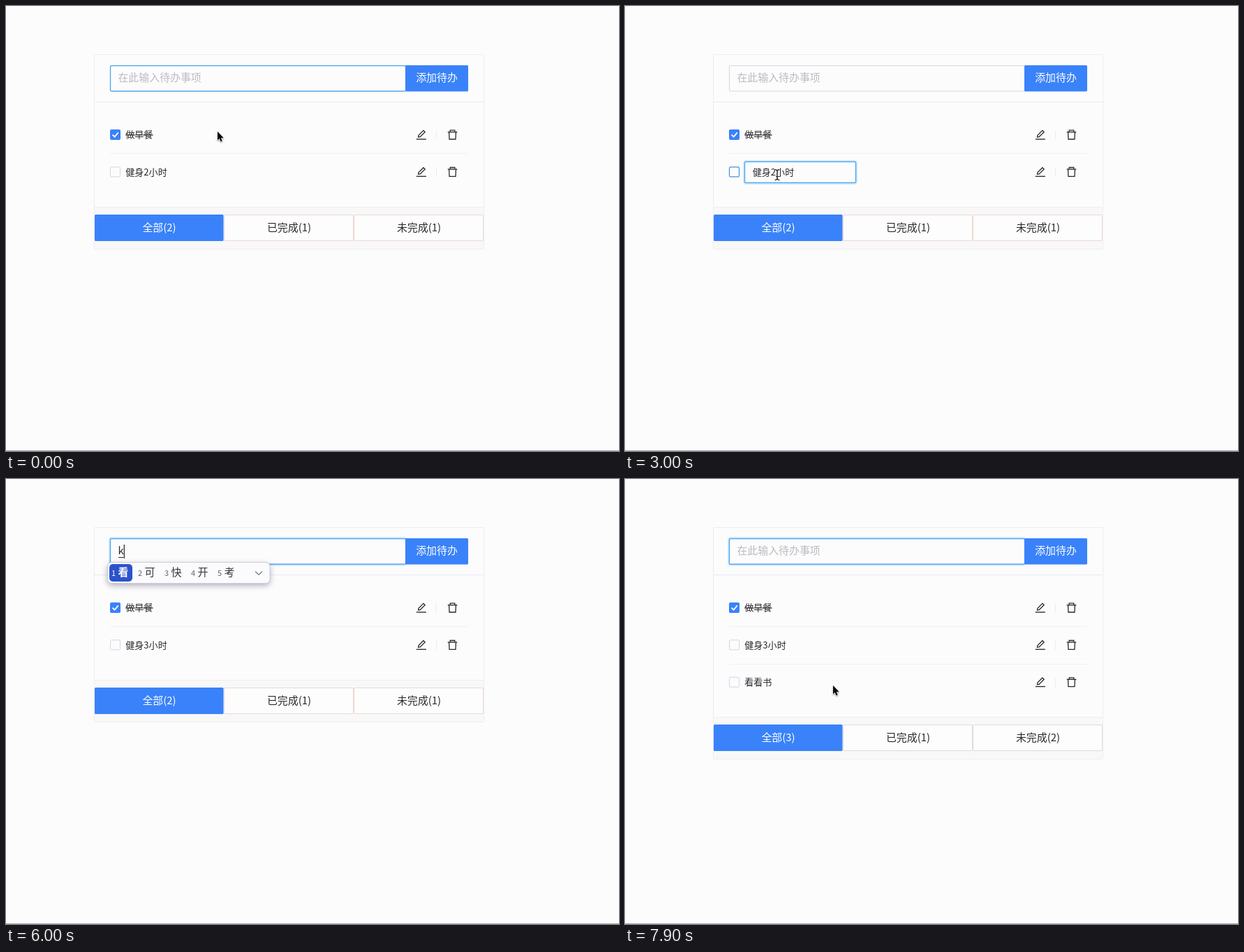
An HTML page with a canvas that plays this animation: 878x638 px, repeating every 8000 ms.

```html
<!DOCTYPE html>
<html lang="zh-CN">
<head>
<meta charset="utf-8">
<title>待办事项</title>
<style>
html, body { margin: 0; width: 100%; height: 100%; overflow: hidden; background: #fcfcfd; }
canvas { display: block; }
</style>
</head>
<body>
<canvas id="stage" width="878" height="638"></canvas>
<script>
const ctx = document.getElementById('stage').getContext('2d');
const FONT = '"Noto Sans CJK SC", "Noto Sans CJK", "Noto Sans", sans-serif';
const LOOP = 8000, STEP = 100, ROW = 53.3;
const BLUE = '#3a82f9', INK = '#29292c', FOCUS = '#45a3ea', BG = '#fcfcfd';
const BIG = 14.93, SMALL = 13.07;

// Moments of the story, in ms
const EDIT = 1500, CARET = 3000, ERASE = 3200, RETYPE = 3400, SAVE = 3700, LEAVE = 4100;
const CLICK = 5000, KEYS = [5800, 6200, 6500], COMMIT = 7000, ADD = 7300, WAKE = 7600;

// Pointer stops: time, x, y
const PATH = [
  [0, 303, 180], [200, 303, 180], [1200, 587, 230], [1600, 587, 230],
  [2700, 219, 241], [3000, 218, 242], [4100, 218, 242], [4300, 341, 122],
  [4800, 329, 102], [7500, 329, 102], [7900, 298, 296]
];
const CANDIDATES = [
  ['看', '可', '快', '开', '考'],
  ['看看', '快快', '开口', '刻苦', '可靠'],
  ['看看书', '快开始', '开口说', '考克斯', '可可树']
];

const clamp = v => Math.max(0, Math.min(1, v));
const within = (t, a, b) => t >= a && t < b;

function pointer(t) {
  let i = 0;
  while (i < PATH.length - 2 && t >= PATH[i + 1][0]) i++;
  const [t0, x0, y0] = PATH[i], [t1, x1, y1] = PATH[i + 1];
  const p = clamp((t - t0) / (t1 - t0)), e = p * p * (3 - 2 * p);
  return { x: x0 + (x1 - x0) * e, y: y0 + (y1 - y0) * e };
}

function fill(color, x, y, w, h, r = 0) {
  ctx.fillStyle = color;
  ctx.beginPath();
  ctx.roundRect(x, y, w, h, r);
  ctx.fill();
}

function frame(color, x, y, w, h, r = 0, width = 1) {
  ctx.strokeStyle = color;
  ctx.lineWidth = width;
  ctx.beginPath();
  ctx.roundRect(x, y, w, h, r);
  ctx.stroke();
}

function text(str, x, y, size, color, weight = 400, align = 'left') {
  ctx.font = `${weight} ${size}px ${FONT}`;
  ctx.textAlign = align;
  ctx.fillStyle = color;
  ctx.fillText(str, x, y);
  return ctx.measureText(str).width;
}

function trace(points, close) {
  points.forEach(([x, y], i) => i ? ctx.lineTo(x, y) : ctx.moveTo(x, y));
  if (close) ctx.closePath();
}

function line(points, color, width) {
  ctx.strokeStyle = color;
  ctx.lineWidth = width;
  ctx.beginPath();
  trace(points);
  ctx.stroke();
}

function field(x, y, w, h, focus, active) {
  if (focus > 0) frame(`rgba(60,165,250,${0.24 * focus})`, x - 1, y - 1, w + 2, h + 2, 3, 3);
  fill(BG, x, y, w, h, 1.5);
  frame('#d8d4dc', x, y, w, h, 1.5);
  if (active > 0) {
    ctx.globalAlpha = active;
    frame(FOCUS, x, y, w, h, 1.5, 1.25);
    ctx.globalAlpha = 1;
  }
}

// Icons live on a 1024 grid centred on (x, y)
function icon(x, y, draw) {
  ctx.save();
  ctx.translate(x, y);
  ctx.scale(0.0176, 0.0176);
  ctx.translate(-512, -512);
  draw();
  ctx.restore();
}

function pen() {
  ctx.fillStyle = INK;
  ctx.beginPath();
  trace([[224, 752], [432, 722], [866, 288], [688, 110], [254, 544]], true);
  trace([[325, 578], [688, 215], [761, 288], [398, 651], [309, 667]], true);
  ctx.fill('evenodd');
  ctx.fillRect(112, 836, 800, 76);
}

function bin() {
  line([[128, 292], [896, 292]], INK, 76);
  line([[324, 270], [324, 148], [700, 148], [700, 270]], INK, 74);
  line([[232, 300], [258, 876], [766, 876], [792, 300]], INK, 74);
}

function checkbox(y, checked, hover) {
  if (!checked) {
    frame(hover ? '#4292dc' : '#d6d3e2', 149.5, y - 7, 14, 14, 1.5, hover ? 1.2 : 1);
    return;
  }
  fill(BLUE, 149, y - 7.5, 15, 15, 2);
  line([[152.6, y], [155.6, y + 3], [160.8, y - 3.2]], '#fff', 1.8);
}

function row(i, label, o = {}) {
  const y = 184.6 + i * ROW;
  checkbox(y, o.done, o.hover);
  if (o.editing) {
    field(171.5, y - 14.5, 159, 30, o.focus, 1);
    text(label, 182.7, y + 4.8, SMALL, INK);
  } else {
    const w = text(label, 171.2, y + 4.8, SMALL, INK);
    if (o.done) fill(INK, 171, y - 0.2, w + 0.5, 1);
  }
  if (o.lit) fill('rgba(80,20,40,0.025)', 580, y - 14, 29, 29, 2);
  icon(594.8, y, pen);
  icon(639.5, y, bin);
  fill('#ecebf0', 616, y - 6, 1, 13);
  if (!o.last) fill('#f0eff2', 149, Math.round(y + 26.6), 513, 1);
}

function tabs(y, items, edge) {
  items.forEach((label, i) => {
    const x = 127 + i * 186;
    if (i === 0) {
      fill(BLUE, x, y, 184.5, 38, 1.5);
    } else {
      fill('#fdfdfd', x, y, 184.5, 37, 1.5);
      frame(edge, x - 0.5, y + 0.5, 185, 37, 1.5);
    }
    text(label, x + 92.5, y + 24.2, BIG, i ? INK : '#fff', i ? 400 : 300, 'center');
  });
}

function popup(words) {
  const n = words[0].length;
  const gap = 23 + n * 15;
  const w = 42.5 + gap * 5;
  ctx.save();
  ctx.shadowColor = 'rgba(30,25,60,0.35)';
  ctx.shadowBlur = 9;
  ctx.shadowOffsetY = 3;
  fill('#fbfafc', 145.5, 119.5, w, 30, 6);
  ctx.restore();
  frame('#cfccd6', 145.5, 119.5, w, 30, 6);
  fill('#2c52cc', 148, 122, 18 + n * 15, 25, 5);
  words.forEach((word, i) => {
    const x = 151 + i * gap;
    text(i + 1, x, 138.6, 11, i ? '#66656b' : '#fff');
    text(word, x + 9.5, 139.3, 15, i ? '#353539' : '#fff', i ? 400 : 700);
  });
  const cx = 129.5 + w;
  line([[cx - 5, 132.5], [cx, 137.2], [cx + 5, 132.5]], '#77757c', 1.2);
}

function typing(t) {
  const count = KEYS.filter(k => t >= k).length;
  if (count && t < COMMIT) {
    const w = text('k k s'.slice(0, count * 2 - 1), 160.5, 108.4, BIG, INK);
    fill(INK, 161, 112, w - 1, 1);
    fill('#111', 160.5 + w, 94, 1.1, 20);
    popup(CANDIDATES[count - 1]);
  } else if (within(t, COMMIT, ADD)) {
    const w = text('看看书', 160.5, 108.4, BIG, INK);
    fill('#111', 161 + w, 94, 1, 20);
  } else {
    text('在此输入待办事项', 160.4, 108.4, BIG, '#bdb9c0');
    const blink = within(t, CLICK, 5200) || within(t, 5600, KEYS[0]) || within(t, ADD, 7700);
    if (blink) fill('#111', 160.5, 94, 1, 20);
  }
}

function shape(points, fillColor, edge, width) {
  ctx.beginPath();
  trace(points, true);
  ctx.lineJoin = 'round';
  ctx.strokeStyle = edge;
  ctx.lineWidth = width;
  ctx.stroke();
  ctx.fillStyle = fillColor;
  ctx.fill();
}

function arrow() {
  ctx.shadowColor = 'rgba(0,0,0,0.3)';
  ctx.shadowBlur = 2;
  ctx.shadowOffsetY = 1;
  shape([[0, 0], [0, 12.3], [2.7, 9.8], [4.6, 14.3], [6.7, 13.4], [4.8, 9.1], [8.6, 9]], '#0b0b0d', '#fff', 1.6);
}

function hand() {
  ctx.beginPath();
  ctx.moveTo(-1.6, 0.8);
  ctx.quadraticCurveTo(-0.2, -1.6, 1.4, 0.6);
  ctx.lineTo(3, 4.4);
  ctx.quadraticCurveTo(4.2, 2.6, 5.4, 4.2);
  ctx.quadraticCurveTo(7, 2.8, 7.8, 4.4);
  ctx.quadraticCurveTo(10, 3.6, 10.2, 6);
  ctx.quadraticCurveTo(10.6, 11, 8.2, 15);
  ctx.lineTo(1.4, 15);
  ctx.quadraticCurveTo(0.2, 11.6, -3.6, 8.8);
  ctx.quadraticCurveTo(-4.4, 6.4, -1.6, 7.4);
  ctx.lineTo(0.6, 8.6);
  ctx.closePath();
  ctx.fillStyle = '#fff';
  ctx.fill();
  ctx.strokeStyle = '#111';
  ctx.lineWidth = 1.2;
  ctx.stroke();
  for (const x of [3, 5, 7]) line([[x, 8.8], [x + 0.2, 12.4]], '#111', 0.9);
}

function beam() {
  const half = s => [[-3.4, s * 7.4], [-1.4, s * 7.2], [0, s * 6], [1.4, s * 7.2], [3.4, s * 7.4]];
  for (const [color, width] of [['#fff', 2.8], ['#111', 1.3]]) {
    line(half(1), color, width);
    line(half(-1), color, width);
    line([[0, -6], [0, 6]], color, width);
  }
  line([[-1.8, 2.6], [1.8, 2.6]], '#111', 1);
}

function cursor(p, kind) {
  ctx.save();
  ctx.translate(p.x, p.y);
  kind();
  ctx.restore();
}

function draw(t) {
  const p = pointer(t);
  const editing = within(t, EDIT, SAVE);
  const added = t >= ADD;
  const overTop = p.x > 149 && p.x < 572 && p.y > 85 && p.y < 122;
  const overPen = p.x > 580 && p.y > 223;
  const overEdit = editing && p.x > 171 && p.x < 331 && p.y > 223;
  const overRow = within(t, 2600, LEAVE);

  fill(BG, 0, 0, 878, 638);
  fill('#a9a8ab', 0, 637, 878, 1);

  const drop = added ? 53 : 0;
  fill('#f8f8f9', 127, 289 + drop, 557, 59);
  frame('#eeedf0', 126.5, 69.5, 558, 279 + drop, 1);
  fill('#e9e9f5', 127, 137, 557, 1);
  fill('#eeeeeb', 127, 288 + drop, 557, 1);

  const focus = t >= CLICK ? clamp((t - CLICK + 100) / 300) : 0;
  const fade = clamp(1 - t / 300);
  field(149.5, 85.5, 423, 36.5, focus, Math.max(focus, fade, overTop ? 1 : 0));
  fill(BLUE, 572, 85, 90, 37.5, 1.5);
  text('添加待办', 617, 108.4, BIG, '#fff', 300, 'center');

  const digit = t < ERASE ? '2' : t < RETYPE ? '' : '3';
  row(0, '做早餐', { done: true });
  row(1, `健身${digit}小时`, {
    editing, focus: clamp((t - EDIT + 100) / 300),
    hover: overRow, lit: overPen, last: !added
  });
  if (editing && within(t, CARET + 100, SAVE)) {
    const lead = ctx.measureText(`健身${digit}`);
    ctx.font = `400 ${SMALL}px ${FONT}`;
    fill('#111', 182.7 + (lead ? ctx.measureText(`健身${digit}`).width : 0), 230, 1, 16);
  }
  if (added) row(2, '看看书', { last: true });

  tabs(299 + drop, added ? ['全部(3)', '已完成(1)', '未完成(2)'] : ['全部(2)', '已完成(1)', '未完成(1)'],
    added ? '#e2dbd7' : '#eed7d3');
  typing(t);

  const hidden = within(t, ERASE, LEAVE) || within(t, KEYS[0], WAKE);
  if (!hidden) cursor(p, overPen ? hand : overTop || overEdit ? beam : arrow);
}

function tick() {
  const t = performance.now() % LOOP;
  draw(Math.floor(t / STEP) * STEP);
  requestAnimationFrame(tick);
}
tick();
</script>
</body>
</html>
```
